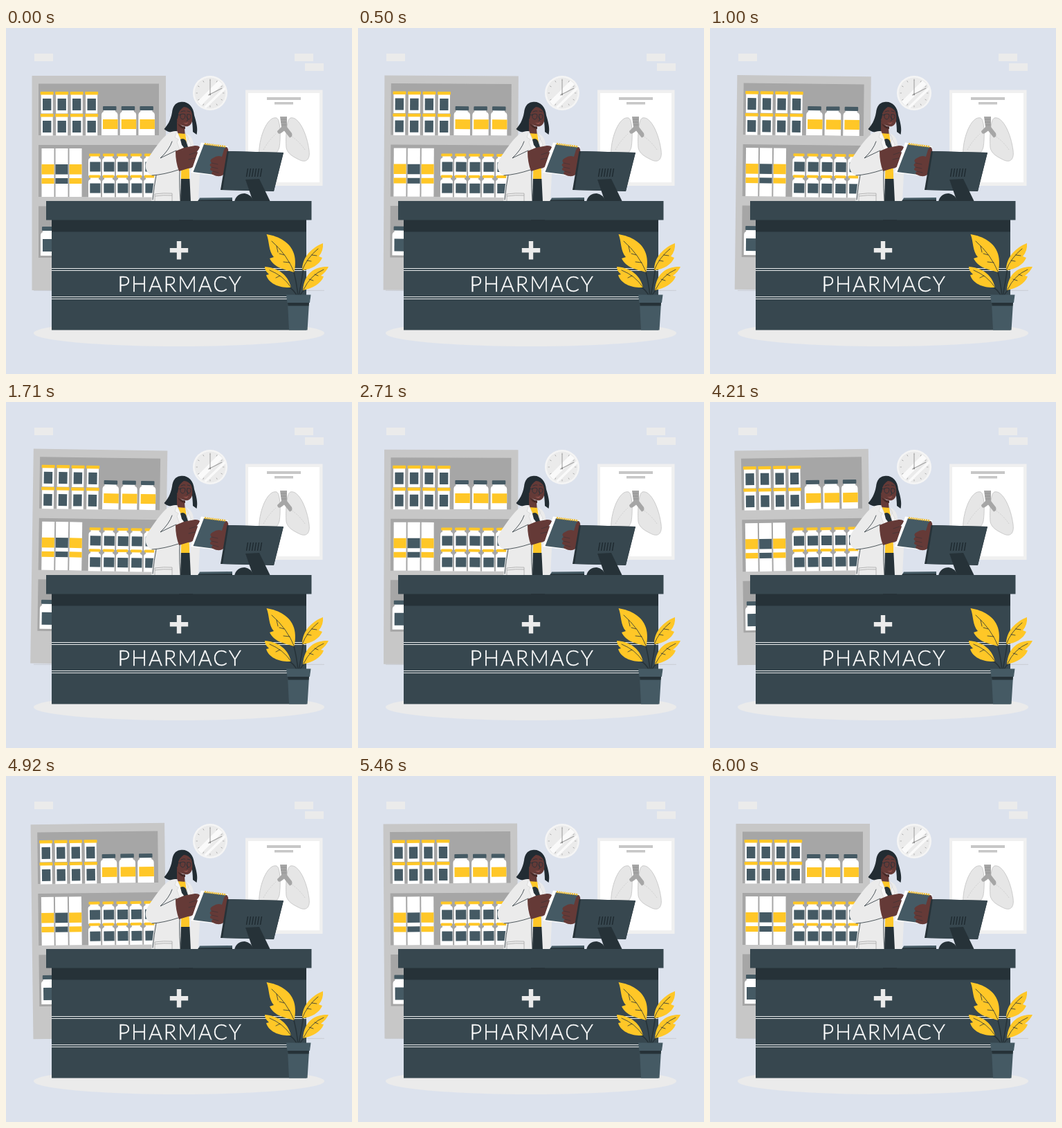
An HTML page that plays this animation: 500 px wide and 500 px high, repeating every 6040 ms.

```html
<!DOCTYPE html>
<html lang="en">
<head>
<meta charset="utf-8">
<title>Pharmacy</title>
<style>
  html, body { margin: 0; width: 100%; height: 100%; overflow: hidden; background: #dce2ed; }
  svg { display: block; width: 100vw; height: 100vh; }
  .slate { fill: #37474f; } .steel { fill: #455a64; } .ink { fill: #263238; }
  .gold { fill: #ffc727; } .white { fill: #fff; } .pale { fill: #ebebeb; }
  .skin { fill: #653a37; }
  .line, .vein { fill: none; stroke: #263238; stroke-width: .8; stroke-linecap: round; stroke-linejoin: round; }
</style>
</head>
<body>
<svg viewBox="0 0 500 500">
  <rect width="500" height="500" fill="#dce2ed"/>
  <path class="pale" d="M41 37h27v11h-27zM417 37h27v11h-27zM432 51h27v11h-27z"/>
  <ellipse class="pale" cx="250" cy="441" rx="210" ry="19"/>
  <path d="M40 379.300Q250 377.500 460 379.300Q250 381 40 379.300" fill="#b9bcc2" stroke="#c7c9ce" stroke-width=".5"/>

  <g id="shelf">
    <path d="M37.500 69H231V379H37.500z" fill="#c7c7c7"/>
    <path d="M47 80.500H221V155H47zM47 169H221V244H47zM47 257.500H221V332H47z" fill="#a6a6a6"/>
    <g id="stock"></g>
  </g>

  <!-- clock -->
  <circle cx="295" cy="94" r="25" fill="#f5f5f5"/>
  <circle cx="295" cy="94" r="22.500" fill="#ebebeb"/>
  <path d="M277 106L307 76L313 81L282 112zM286 114L316 85L317 89L289 116z" fill="#fafafa"/>
  <g id="ticks" stroke="#a6a6a6" stroke-width=".8"></g>
  <path d="M295 97V75M292.500 97L312 87" stroke="#a0a0a0" stroke-width="1.100" fill="none" stroke-linecap="round"/>
  <circle cx="295" cy="95.700" r="1.200" fill="#8c8c8c"/>

  <!-- lung poster -->
  <path d="M346 89.500H457.500V228H346z" fill="#f0f0f0"/>
  <path class="white" d="M350 94H453V223H350z"/>
  <path d="M377 100h49v4h-49zM388 107h27v3.500h-27z" fill="#c7c7c7"/>
  <g fill="#e6e6e6" stroke="#c7c7c7" stroke-width=".9">
    <path d="M391 130C379 127 368 152 366 174C364 190 371 194 379 189C386 184 393 181 395 172C397 160 397 132 391 130z"/>
    <path d="M411 130C423 127 435 153 438 177C440 192 432 195 423 190C415 186 407 182 405 173C404 160 405 132 411 130z"/>
  </g>
  <path d="M372 176Q379 163 390 153M432 176Q424 164 412 156" fill="none" stroke="#cfcfcf" stroke-dasharray="2 1.500"/>
  <path d="M396 128H406L406 143L413 152Q415 157 410 158.500L402 148.500L398 151.500Q393 155 392 149L398 143z" fill="#a6a6a6"/>
  <path d="M397 132h8M397 136h8M398 140h7" stroke="#8e8e8e" stroke-width=".8"/>

  <!-- pharmacist -->
  <path d="M252 107C244 108 241 114 240 122C238 134 233 141 228.500 146C233 151 240 150 245 153.500Q250 146 249 137L268 126Q270 143 270 150L275.500 154C277.500 145 275 136 272 126C271 113 262 105 252 107z" fill="#222c33"/>
  <path class="skin" d="M247 134L247 154L255 167L259 157L258 145z"/>
  <path class="skin" d="M246 125C247 115 256 111 264 114C269 119 270 129 269 135C267 141 263 143 259 142C251 141 245 135 246 125z"/>
  <path d="M248 138Q252 142 259 142.500L259 146Q251 145 248 138" fill="#462927"/>
  <path class="line" d="M252 125q4-2 7 0q0 7-4 7q-4-1-3-7zM262 125q3-1 5 1q0 6-3 6q-3-1-2-7M252 126L247 125M253 121q4-2 6-1M262 120l4 1M261 128l2 5-2 1"/>
  <path d="M256 136.500Q260 138 264 136Q261 141 256 136.500" fill="#9a5650"/>
  <path d="M241 129Q240 110 256 109Q267 110 269 122Q264 114 257 114Q251 118 249 124Q249 130 246 134z" fill="#222c33"/>
  <path class="gold" d="M247 152L260 153L266 179L265 220H250z"/>
  <path class="ink" d="M252 218H266.500L268 251H251z"/>
  <path class="pale" d="M247 149C240 149 235 150 232 156L217 191L210 251H252L254 176z"/>
  <path class="pale" d="M259 152Q267 154 270 163L280 211L278 251H267L264 190z"/>
  <path d="M247 149L244 158L249 161L247 165L254 184L258 174zM259 152L264 159L262 163L264 180L267 168z" fill="#f5f5f5" stroke="#c9c9c9" stroke-width=".5"/>
  <path class="ink" d="M252 161Q257 158 260 163L263 172L258 174L254 169z"/>
  <path class="pale" d="M237 151C228 155 214 175 205 189C199 198 201 209 211 213C224 213 238 209 250 204L246 176L226 190L240 166z"/>
  <path class="line" d="M240 164Q236 176 223 188L246 177M211 213Q228 212 249 205M217 213Q214 228 212 248M253 182Q249 212 252 250"/>
  <path d="M215 251V240Q228 238 240 239V251M215 243Q228 241 240 242" fill="none" stroke="#a6a6a6" stroke-width=".8"/>
  <path class="skin" d="M245 178L257 173L273 170Q281 170 280 174L275 179Q281 180 278 184L273 196Q271 203 263 203L250 207Q245 194 245 178z"/>
  <path class="white" d="M282 165.500L321 171L308 214L267 209z"/>
  <path class="steel" d="M286 168L320 172.500L309 213L270.500 208z"/>
  <path d="M287 167.500L318 171.500" stroke="#e8b320" stroke-width="2.800" stroke-dasharray="1.800 1"/>
  <path class="skin" d="M280 172Q273 171 264 177L266 183L275 180zM318 172Q322 173 321 180L318 193Q320 205 315 211Q309 217 299 212Q295 210 299 207Q292 205 297 201Q292 198 297 195Q293 191 299 188Q306 183 312 186L315 176z"/>
  <path class="line" stroke-opacity=".55" d="M299 207l8 2M297 201l9 2M297 195l9 2M265 183l9-3M264 190l9-2"/>

  <!-- desk items -->
  <path class="steel" d="M277 251L280 245.500L327 245V251z"/>
  <path class="ink" d="M277 251L278 248.500L327 248V251zM330 251Q333 239 345 239Q354 240 358 251z"/>
  <path class="ink" d="M319.500 178L401 180L387 236L310 234z"/>
  <path class="slate" d="M322 178L401 180L387 235.500L313 234z"/>
  <path class="ink" d="M346 219L366 218L382 251H357z"/>
  <path d="M349.500 203l-2 12m6-12l-2 12m6-12l-2 12m6-12l-2 12m6-12l-2 12m6-12l-2 12" stroke="#1e292f" stroke-width="1.400"/>

  <!-- counter -->
  <path class="slate" d="M66 277H434V436.500H66z"/>
  <path class="ink" d="M66 277H434V294.500H66z"/>
  <path class="slate" d="M58 250H441.500V277.500H58z"/>
  <path class="ink" d="M250 277H270V278.500H250z"/>
  <path d="M250 308V334.500M236.800 321.200H263.200" stroke="#ebebeb" stroke-width="6.400"/>
  <path d="M66 347.500H434M66 350.500H434M66 388.500H434M66 391.500H434" stroke="#e8ebec"/>
  <text x="161.500" y="381" font-family="Lato, 'Open Sans', sans-serif" font-weight="300" font-size="30.500" letter-spacing="1.900" fill="#fff" stroke="#fff" stroke-width=".4">PHARMACY</text>

  <!-- plant -->
  <path class="vein" d="M422 388Q420 367 415 349M423 388Q427 368 430 346M421 388Q416 378 407 373M424 388Q428 380 436 374" style="stroke-width:1.500"/>
  <g class="gold">
    <path d="M376.500 298C395 301 411 310 416 326C419 335 418 346 416.500 353C403 349 388 347 381 333L387 331C379 322 381 309 376.500 298z"/>
    <path d="M458 311C443 317 428 330 428 350C441 349 453 342 457 332L452 330Q459 322 458 311z"/>
    <path d="M374 345C390 346 407 354 412 375C396 376 380 370 376 357L380 356Q374 351 374 345z"/>
    <path d="M466 345C449 344 431 352 429 379C443 376 455 370 459 359L455 358Q463 352 466 345z"/>
  </g>
  <path class="vein" d="M384 308Q406 327 417 354M391 315l2 9M402 328l-7-2M410 339l-9-1M451 319Q435 332 428 350M442 328l7 1M435 336l6 1M381 350Q401 358 412 375M396 358l-6 3M459 349Q440 357 430 378M446 356l5 2M438 363l6 2"/>
  <path class="steel" d="M407 397H438L435.500 436.500H409z"/>
  <path class="ink" d="M407 396H438L437.500 401.500H407.500z"/>
  <path class="steel" d="M405 385.500H440.500L439 397H406.500z"/>
</svg>
<script>
const $ = id => document.getElementById(id);
const rect = (cls, x, y, w, h, r = 0) =>
  `<rect class="${cls}" x="${x}" y="${y}" width="${w}" height="${h}" rx="${r}"/>`;

const jar = (x, y) =>
  rect('white', x + 1, y + 3, 17, 28.5) + rect('gold', x, y, 19, 4.5, .8) + rect('steel', x + 3.3, y + 10, 12.4, 17);

const bottle = (x, y) =>
  `<path class="white" d="M${x + 3} ${y + 5}h17v3q3.5 1 3.5 5v29h-23.5v-29q0-4 3-5z"/>` +
  rect('steel', x + 2, y, 19.5, 6, 1);

const vial = (x, y) =>
  `<path class="white" d="M${x + 3} ${y + 3}h12v3q3 1 3 4v22h-18v-22q0-3 3-4z"/>` +
  rect('gold', x + 1, y, 16, 4, 1) + rect('steel', x + 2.3, y + 12, 15.2, 14);

let stock = '';
for (let i = 0; i < 4; i++) stock += jar(49.7 + i * 21.5, 92) + jar(49.7 + i * 21.5, 124);
for (let i = 0; i < 3; i++) {
  const x = 138 + i * 26.7, band = i === 1 ? 'steel' : 'gold', box = 51.5 + i * 20;
  stock += bottle(x, 113) + rect('gold', x + 2, 132, 21.5, 14);
  stock += rect('white', box, 174, 18, 70) + rect(band, box, 197, 18, 14.5) + rect(band, box, 217, 18, 8);
}
for (let i = 0; i < 5; i++) stock += vial(119 + i * 20, 181.5) + vial(119 + i * 20, 212.5);
stock += bottle(50, 287) + rect('steel', 53, 305, 20, 18);
$('stock').innerHTML = stock;

for (let a = 0; a < 360; a += 30)
  $('ticks').innerHTML += `<path d="M295 73.500v2.500" transform="rotate(${a} 295 94)"/>`;

// The shelf sways at constant speed between +1 and -1 degrees.
function draw(now) {
  const p = (now % 6040) / 6000;
  const angle = p < .25 ? 4 * p : p < .75 ? 2 - 4 * p : 4 * p - 4;
  $('shelf').setAttribute('transform', `rotate(${angle} 134.25 224)`);
  requestAnimationFrame(draw);
}
draw(performance.now());
</script>
</body>
</html>
```
